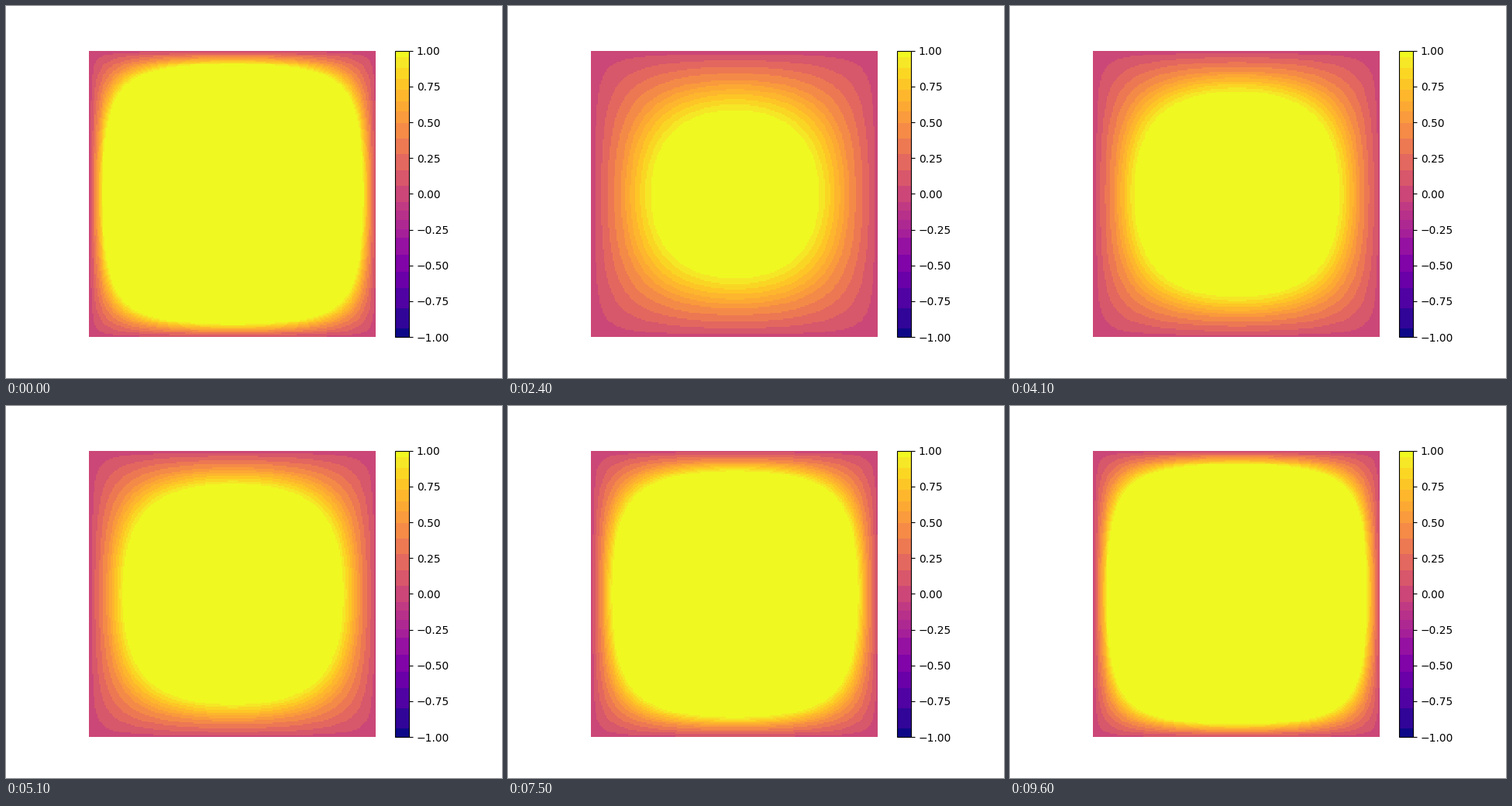
These frames come from a looping animation (640 px wide and 480 px high, 9.7 s). A matplotlib script:

```python
import numpy as np
import matplotlib.pyplot as plt
from matplotlib.animation import FuncAnimation
from matplotlib.colors import ListedColormap

FRAMES = 97
SIZE = 200
GROWTH = 0.02
BANDS = 22


def banded_cmap(steps=512):
    """Plasma in flat bands, evenly spaced between a few key levels."""
    edges = np.interp(np.arange(BANDS + 1),
                      [0, 3, 6, 10, 15, 21, BANDS],
                      [-1.08, -0.66, -0.31, -0.055, 0.497, 0.954, 1.08])
    values = -1 + (np.arange(steps) + 0.5) * 2 / steps
    band = np.digitize(values, edges) - 1
    mids = (edges[:-1] + edges[1:]) / 2
    return ListedColormap(plt.get_cmap("plasma")((mids[band] + 1) / 2))


wave = np.sin(np.pi * np.arange(SIZE) / SIZE)
mode = np.outer(wave, wave)


def field(n):
    # The loop opens on the last state, then growth starts over
    return mode * np.exp(GROWTH * ((n - 1) % FRAMES))


fig, ax = plt.subplots(figsize=(6.4, 4.8), dpi=100)
image = ax.imshow(field(0), cmap=banded_cmap(), vmin=-1, vmax=1,
                  interpolation="nearest")
ax.axis("off")
fig.colorbar(image, ax=ax)


def update(n):
    image.set_data(field(n))
    return [image]


anim = FuncAnimation(fig, update, frames=FRAMES, interval=100,
                     repeat=True, repeat_delay=0)
plt.show()
```
